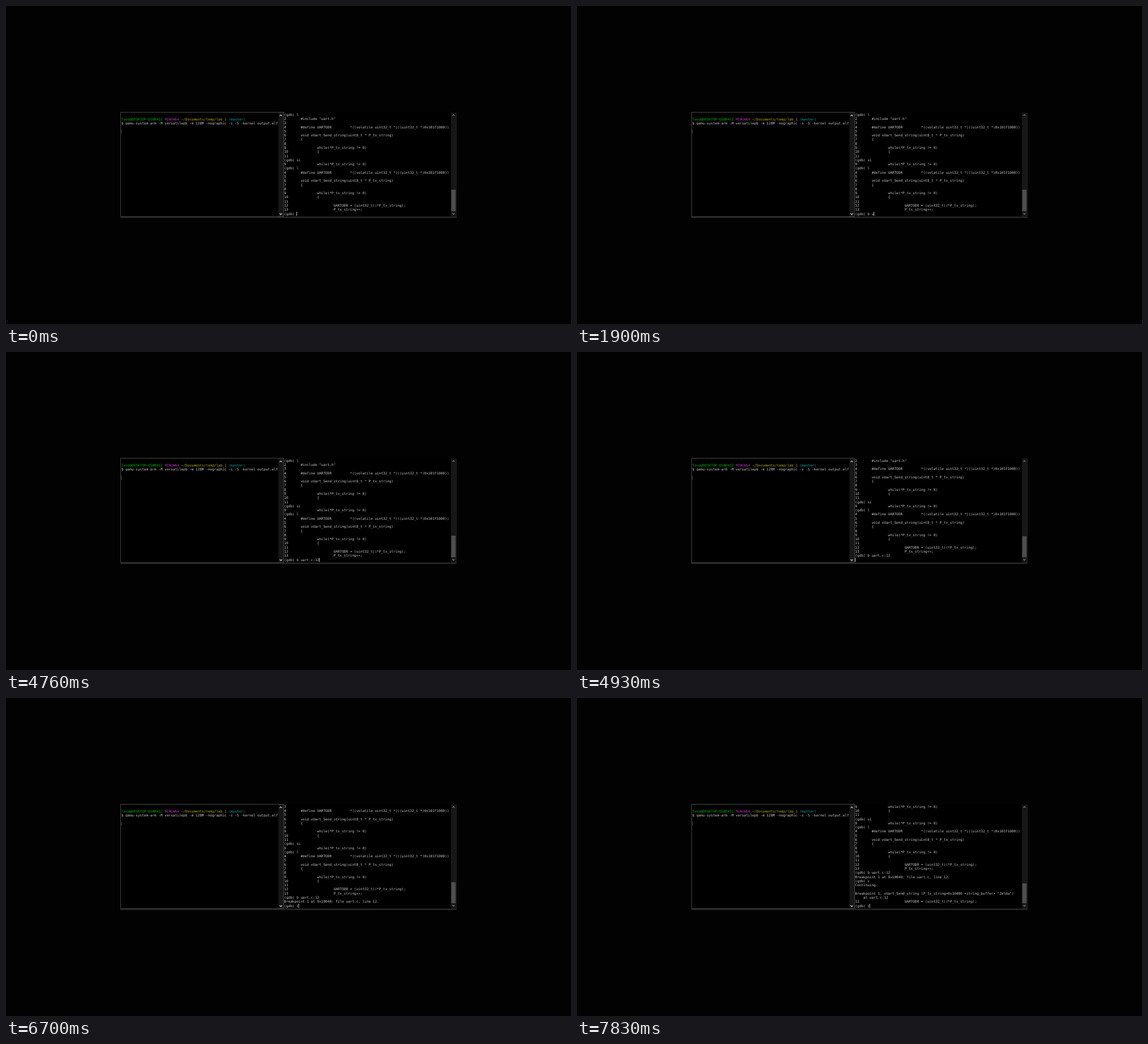
These frames come from a looping animation (998x561 px, 8000 ms). An HTML page:

```html
<!DOCTYPE html>
<html lang="en">
<head>
<meta charset="utf-8">
<title>Debugger session</title>
<style>
html, body { margin: 0; width: 100%; height: 100%; overflow: hidden; background: #020203; }
svg { display: block; width: 998px; height: 561px; }
text {
  font: 6.06px "DejaVu Sans Mono", monospace;
  fill: #cccccc;
  white-space: pre;
  text-rendering: geometricPrecision;
}
.arrow { fill: none; stroke-width: 1.1; }
</style>
</head>
<body>
<svg viewBox="0 0 998 561">
  <rect width="998" height="561" fill="#020203"/>
  <rect x="202" y="188" width="594" height="186" fill="#1e1e1e"/>
  <rect x="203" y="188" width="278.5" height="183" fill="#000"/>
  <rect x="481.5" y="188" width="8" height="183" fill="#171717"/>
  <rect x="491" y="188" width="295" height="183" fill="#000"/>
  <rect x="786" y="188" width="9" height="183" fill="#171717"/>
  <g fill="#444">
    <rect x="202" y="187" width="288" height="1"/>
    <rect x="202" y="187" width="1" height="185"/>
    <rect x="490" y="187" width="1" height="185"/>
    <rect x="202" y="371" width="289" height="1"/>
  </g>
  <rect x="202" y="373" width="594" height="1" fill="#2c2c2c"/>
  <rect id="thumb" x="786.4" width="7.8" fill="#4d4d4d"/>
  <g class="arrow" stroke="#e0e0e0">
    <path d="M483.4 194.2l2 -2l2 2"/>
    <path d="M483.4 366l2 2l2 -2"/>
  </g>
  <g class="arrow" stroke="#858585">
    <path d="M788.4 193.6l2 -2l2 2"/>
    <path d="M788.4 365.4l2 2l2 -2"/>
  </g>
  <g id="shell"></g>
  <rect x="203.6" y="218.2" width="0.8" height="7" fill="#4c5a4c"/>
  <g id="rows"></g>
  <rect id="caret" width="0.9" height="7.2" fill="#d0d0d0"/>
</svg>
<script>
const LOOP = 8000, CHAR = 3.648, LINE = 7.28, ROWS = 25;
const LEFT = 491.2, TOP = 188.3, BASE = 5.5;
const $ = id => document.getElementById(id);

function addText(parent, x, y, str, fill) {
  const el = document.createElementNS("http://www.w3.org/2000/svg", "text");
  el.setAttribute("x", x);
  el.setAttribute("y", y);
  el.textContent = str;
  if (fill) el.style.fill = fill;
  parent.append(el);
  return el;
}

// Left pane
const shellText = (col, y, str, fill) => addText($("shell"), 203.8 + col * CHAR, y, str, fill);
shellText(0, 201.5, "Tavo@DESKTOP-Q58R41Z", "#00b400");
shellText(21, 201.5, "MINGW64", "#bf2fbf");
shellText(29, 201.5, "~/Documents/temp/lab_1", "#bfb000");
shellText(52, 201.5, "(master)", "#00b0a8");
shellText(0, 208.8, "$ qemu-system-arm -M versatilepb -m 128M -nographic -s -S -kernel output.elf");

// Right pane
const code = {
  2: '\t#include "uart.h"',
  4: "\t#define UARTODR\t\t*((volatile uint32_t *)((uint32_t *)0x101f1000))",
  6: "\tvoid vUart_Send_string(uint8_t * P_tx_string)",
  7: "\t{",
  9: "\t\twhile(*P_tx_string != 0)",
  10: "\t\t{",
  12: "\t\t\tUARTODR = (uint32_t)(*P_tx_string);",
  13: "\t\t\tP_tx_string++;"
};
const expand = s => {
  let out = "";
  for (const c of s) out += c === "\t" ? " ".repeat(8 - out.length % 8) : c;
  return out;
};
const src = n => expand(n + (code[n] || ""));
const list = (a, b) => Array.from({ length: b - a + 1 }, (_, i) => src(a + i));

const start = ["(gdb) l", ...list(2, 11), "(gdb) si", src(9), "(gdb) l", ...list(4, 13)];
const broke = [...start, "(gdb) b uart.c:12", "Breakpoint 1 at 0x10040: file uart.c, line 12."];
const stopped = [...broke, "(gdb) c", "Continuing.", "",
  'Breakpoint 1, vUart_Send_string (P_tx_string=0x10080 <string_buffer> "Zelda")',
  "    at uart.c:12", src(12)];

// Key times of the typed command, one per character
const keys = [1300, 1460, 1900, 1960, 2100, 2230, 2630, 2830, 3230, 4000, 4060];
const command = "b uart.c:12";
// Caret switches: off, on, off, ...
const blinks = [300, 700, 1230, 1300, 3800, 4000, 4360, 4760, 5560, 5930, 6330, 6700, 7600, 7830];

const lastRows = (log, input) => [...log, input].slice(-ROWS);

function screen(t) {
  if (t < 4930) {
    const n = keys.filter(k => k <= t).length;
    return lastRows(start, "(gdb) " + command.slice(0, n));
  }
  if (t < 5130) return lastRows(broke.slice(0, -1), "");
  if (t < 7060) return lastRows(broke, "(gdb) " + (t < 6700 ? "" : "c"));
  const end = lastRows(stopped, "(gdb) " + (t < 7830 ? "" : "c"));
  if (t >= 7230) return end;
  // The scroll reaches the screen from the top down
  const next = lastRows([...broke, "(gdb) c"], "");
  if (t < 7200) return [...next.slice(0, 8), ...lastRows(broke, "(gdb) c").slice(8)];
  return [...end.slice(0, 2), ...next.slice(2)];
}

const rows = Array.from({ length: ROWS }, (_, i) =>
  addText($("rows"), LEFT + 0.1, TOP + i * LINE + BASE, ""));

function draw(t) {
  const lines = screen(t);
  rows.forEach((el, i) => {
    if (el.textContent !== lines[i]) el.textContent = lines[i];
  });
  const caret = $("caret");
  caret.setAttribute("x", LEFT + lines[ROWS - 1].length * CHAR - 0.1);
  caret.setAttribute("y", TOP + (ROWS - 1) * LINE);
  caret.style.opacity = blinks.filter(b => b <= t).length % 2 ? 0 : 1;
  const y = t < 4930 ? 324 : t < 7230 ? 325 : 327;
  $("thumb").setAttribute("y", y);
  $("thumb").setAttribute("height", 362 - y);
}

const t0 = performance.now();
function tick() {
  draw((performance.now() - t0) % LOOP);
  requestAnimationFrame(tick);
}
draw(0);
requestAnimationFrame(tick);
</script>
</body>
</html>
```
